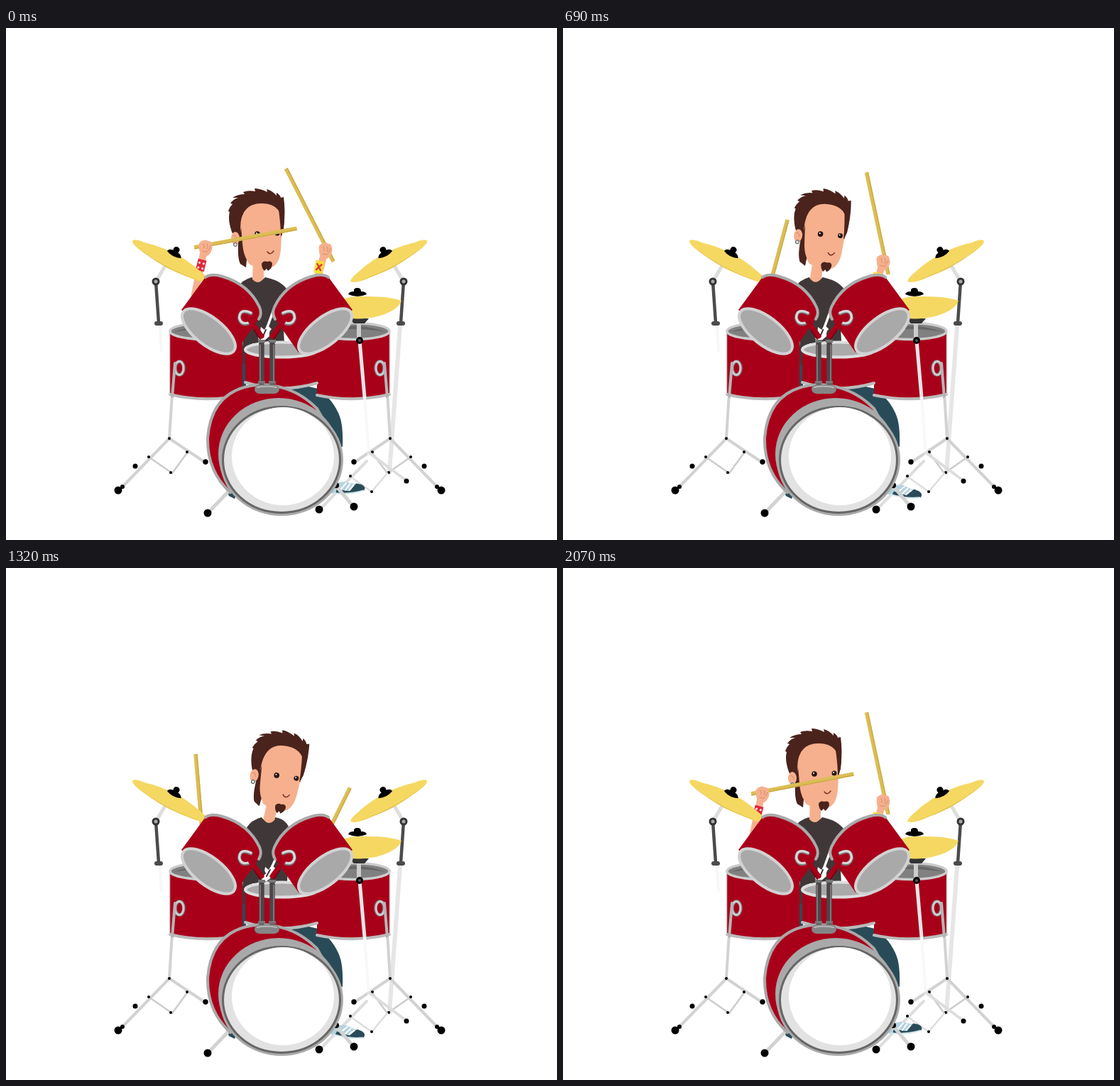
Write an HTML page that moves like this. It is 776 px wide and 721 px high and loops after 2.1 s.

```html
<!DOCTYPE html>
<html lang="en">
<head>
<meta charset="utf-8">
<title>Drummer</title>
<style>
html, body { margin: 0; width: 100%; height: 100%; overflow: hidden; background: #fff }
svg { display: block; width: 776px; height: 721px }
.line { fill: none; stroke-linecap: round; stroke-linejoin: round }
</style>
</head>
<body>
<svg viewBox="0 0 776 721">
<defs>
  <g id="stick"><path d="M0 0H147" stroke="#dcbd55" stroke-width="5.5"/><path d="M0 2H147" stroke="#c9a845" stroke-width="1.2"/></g>

  <g id="fist" fill="#f6b08e">
    <path d="M-9-4Q-10-9-5-11Q0-14 4-11Q9-11 9-6Q11-1 8 4Q5 11-2 11Q-9 9-9-4Z"/>
    <path class="line" d="M-3-7Q0-4-2-1M2-7Q5-4 2 0M7-4Q7-1 4 2M-4 3Q0 5 3 4" stroke="#d48b6c"/>
  </g>

  <!-- cymbal, stand and floor tom, shared by both sides -->
  <g id="side">
    <g class="line">
      <path d="M224 335L213 354" stroke="#ddd" stroke-width="5"/>
      <path d="M211 357L215 415" stroke="#4b4b4b" stroke-width="4.5"/>
      <path d="M212 416H218" stroke="#4b4b4b" stroke-width="6"/>
      <circle cx="211" cy="357" r="4" fill="#aaa" stroke="#333" stroke-width="3"/>
    </g>
    <g transform="translate(232 328) rotate(27.5)">
      <path d="M-61 0Q-60-5-45-6Q0-18 45-6Q60-3 61 1Q55 8 30 9Q0 13-30 8Q-58 6-61 0Z" fill="#f5d862"/>
      <path d="M-50 5Q0 14 52 5Q30 10 0 11Q-30 10-50 5Z" fill="#e3c24f"/>
      <path d="M-11-10Q-10-15-4-15Q-6-21 0-22Q6-21 4-15Q10-14 11-10Q0-5-11-10Z"/>
    </g>
    <path d="M230 427V516Q281 529 333 516V427Z" fill="#a9001a"/>
    <path class="line" d="M231 516Q281 528 333 517" stroke="#bbb" stroke-width="4"/>
    <path d="M230.500 427V516" stroke="#ccc" stroke-width="1.500"/>
    <ellipse cx="282" cy="427" rx="51" ry="11.500" fill="#808080" stroke="#ccc" stroke-width="3.500"/>
    <path d="M236 428Q281 411 328 428Q281 420 236 428Z" fill="#666"/>
    <g class="line" stroke="#b5b5b5">
      <ellipse cx="244.500" cy="479" rx="6" ry="9.500" stroke="#777" stroke-width="4.500"/>
      <ellipse cx="244" cy="479" rx="6" ry="9.500" stroke="#ccc" stroke-width="3"/>
      <path d="M238 472L234 520" stroke-width="4"/>
      <path d="M233.500 522L230 578" stroke="#d2d2d2" stroke-width="4"/>
      <path d="M230 578L163 647M230 578L278 610" stroke="#d2d2d2" stroke-width="4"/>
      <path d="M201 604L234 627L256 597" stroke="#ccc" stroke-width="2.500"/>
    </g>
    <circle cx="158" cy="651" r="5.500"/><circle cx="164" cy="646" r="3"/>
    <circle cx="281" cy="611" r="3.700"/><circle cx="182" cy="617" r="3.500"/>
    <circle cx="201" cy="604" r="2"/><circle cx="232" cy="626" r="2"/><circle cx="255" cy="597" r="2"/><circle cx="230" cy="578" r="2"/>
  </g>

  <g id="tom">
    <path d="M247 397L280 352Q287 346 304 350Q342 361 357 394Q360 403 355 411L323 457Z" fill="#a9001a"/>
    <path class="line" d="M281 351Q289 345 305 350Q342 361 357 393Q361 402 356 410" stroke="#aaa" stroke-width="4"/>
    <ellipse cx="285.500" cy="427" rx="45" ry="19.500" transform="rotate(38 285.500 427)" fill="#a9a9a9" stroke="#d2d2d2" stroke-width="4"/>
    <path class="line" d="M345 402Q329 394 328.500 409Q331 419 341 416" stroke="#777" stroke-width="5"/>
    <path class="line" d="M345 401Q329 394 328.500 408Q331 418 341 415" stroke="#d8d8d8" stroke-width="3.200"/>
    <path class="line" d="M344 412L360 434" stroke="#a9001a" stroke-width="7"/>
    <path class="line" d="M349 425L358 438" stroke="#7a0016" stroke-width="2"/>
    <path class="line" d="M360 445V500" stroke="#4c4648" stroke-width="7.500"/>
    <path d="M358 446V500" stroke="#8a8587" stroke-width="1.500"/>
    <path d="M355 441H365M355 499H365" stroke="#777" stroke-width="4"/>
  </g>
</defs>

<g id="torso">
  <path class="line" d="M322 370L315 395" stroke="#f6b08e" stroke-width="11"/>
  <path d="M346 351Q355 362 365 351Q383 354 388 370L392 444H334Q327 400 327 365Q332 355 346 351Z" fill="#403838"/>
  <path id="sleeve" d="M372 353Q390 357 400 374L382 400Z" fill="#403838"/>
  <path class="line" d="M379 391L367 424" stroke="#fff" stroke-width="3.500"/>
  <path d="M368 418L374 424Q370 427 371 434L363 441Q355 441 355 436L361 430Q357 426 359 421L364 425Z" fill="#fff"/>
  <path class="line" d="M366 425L362 434" stroke="#403838" stroke-width="2"/>
</g>
<path d="M334 436L347 425V450Q338 460 338 475H331Z" fill="#403838"/>
<path d="M331 474H338V508H331ZM395 498L440 508Q462 525 470 547Q475 560 474 590L440 575ZM310 650L325 655L322 663L314 659Z" fill="#294b57"/>

<g id="head">
  <path d="M348 325H363V352Q356 363 347 354Z" fill="#f6b08e"/>
  <path d="M338 337L330 332Q326 325 327 304L318 287Q312 270 315 259L313 258Q315 252 319 248L316 247Q320 241 327 239L319 239Q327 234 336 234L334 231Q341 228 351 230L350 226Q358 226 368 231L367 227Q375 229 381 236L381 232Q386 235 387 239L391 238Q395 268 388 294L377 275L336 300Z" fill="#4b231d"/>
  <path d="M330 285Q329 247 360 247Q388 247 389 275L387 312Q386 328 378 335Q368 341 356 338L343 333Q335 322 331 306Z" fill="#f6b08e"/>
  <path d="M384 256Q387 278 387 294L391 283Q393 266 391 248Z" fill="#4b231d"/>
  <path d="M328 303L331 280L333 303Q334 318 339 326L338 337L330 332Q326 320 328 303Z" fill="#4b231d"/>
  <ellipse cx="323" cy="296" rx="6" ry="9" fill="#f6b08e"/>
  <path class="line" d="M320 293Q323 290 325 297" stroke="#d48b6c"/>
  <circle cx="323" cy="305" r="2.500" fill="#ddd" stroke="#555"/>
  <g fill="#291713"><circle cx="354" cy="290" r="3.800"/><circle cx="382" cy="289" r="3.500"/></g>
  <g fill="#fff"><circle cx="353" cy="289" r="1"/><circle cx="381" cy="288" r="1"/></g>
  <path class="line" d="M368 315Q372 321 377 314" stroke="#7c3526" stroke-width="1.500"/>
  <path d="M360 332Q362 327 368 329Q374 327 375 332Q375 338 369 342L367 339L364 342Q360 338 360 332Z" fill="#4b231d"/>
</g>

<use id="stickL" href="#stick"/>
<g id="armL">
  <path class="line" d="M-3 8L-15 65" stroke="#f6b08e" stroke-width="10"/>
  <g transform="translate(-6 23) rotate(14)"><path d="M-6-8H6V8H-6Z" fill="#e0283b"/><path class="line" d="M-3-3V-3M3-3V-3M-3 4V4M3 4V4" stroke="#fff" stroke-width="3"/></g>
  <use href="#fist"/>
</g>
<use id="stickR" href="#stick"/>
<g id="armR">
  <path class="line" d="M-3 8L-18 65" stroke="#f6b08e" stroke-width="10"/>
  <g transform="translate(-9 22) rotate(10)"><path d="M-6-9H6V9H-6Z" fill="#f7df38"/><path class="line" d="M-3-4L3 4M3-4L-3 4" stroke="#d83a35" stroke-width="2.500"/></g>
  <use href="#fist"/>
</g>

<path class="line" d="M217 420L219 455" stroke="#f7f7f7" stroke-width="4"/>
<path class="line" d="M555 420L540 626" stroke="#e6e6e6" stroke-width="6"/>
<use href="#side"/>
<use href="#side" transform="translate(771) scale(-1 1)"/>

<path d="M337 454V499Q387 515 439 499V454Z" fill="#a9001a"/>
<path class="line" d="M337 499Q387 515 438 500" stroke="#bbb" stroke-width="4"/>
<ellipse cx="388" cy="453" rx="51" ry="10.500" fill="#aaa" stroke="#dedede" stroke-width="4"/>

<!-- hi-hat -->
<g class="line" stroke="#ddd">
  <path d="M498 440L505 520" stroke="#e5e5e5" stroke-width="5"/>
  <path d="M497 415V437" stroke="#ccc" stroke-width="6"/>
  <path d="M505 520L511 600" stroke="#f8f8f8" stroke-width="4"/>
  <path d="M511 598L562 636M508 610L445 675" stroke-width="4"/>
  <path d="M484 631L515 653L537 627" stroke-width="2.500"/>
</g>
<path d="M483 409H511L505 416H490Z" fill="#333"/>
<circle cx="498" cy="440" r="5"/><circle cx="498" cy="440" r="2" fill="#555"/>
<path d="M458 391Q476 377 500 378Q538 377 557 384Q552 399 520 407Q488 413 460 404Z" fill="#f5d862"/>
<path d="M482 375Q483 371 490 371Q489 366 495 366Q500 366 500 371Q507 371 508 375Q495 381 482 375Z"/>
<circle cx="564" cy="638" r="3.500"/><circle cx="485" cy="631" r="2"/><circle cx="515" cy="653" r="2"/>

<g id="shoe">
  <path d="M458 643L478 641Q490 646 501 647Q508 651 504 656Q480 660 458 656Z" fill="#b4d2dd"/>
  <path id="toe" d="M466 651L484 655L494 645L501 647Q508 651 504 656Q480 659 464 656Z" fill="#294b57"/>
  <path id="heel" d="M458 643L472 642L484 654L462 655Z" fill="#294b57"/>
  <path class="line" d="M472 651L480 643M478 653L485 645M484 653L490 647" stroke="#fff" stroke-width="2"/>
  <path class="line" d="M462 656Q484 660 503 656" stroke="#d8e8ed" stroke-width="2"/>
</g>

<!-- bass drum -->
<g class="line" stroke="#d2d2d2" stroke-width="5">
  <path d="M314 652L288 679M464 644L487 671"/>
</g>
<circle cx="284" cy="683" r="5.500"/><circle cx="490" cy="674" r="5.500"/><circle cx="441" cy="678" r="5.500"/><circle cx="465" cy="644" r="4"/>
<path d="M316 654Q283 624 284 577Q290 505 361 502Q407 504 438 536L460 575Z" fill="#a9001a" stroke="#a9a9a9" stroke-width="4"/>
<ellipse cx="384" cy="600" rx="85" ry="79" fill="#a9a9a9"/>
<ellipse cx="388" cy="608" rx="85" ry="77" fill="#e2e2e2" stroke="#aaa" stroke-width="4"/>
<ellipse cx="388" cy="608" rx="82.500" ry="74.500" fill="none" stroke="#666" stroke-width="3"/>
<ellipse cx="390" cy="603" rx="72" ry="69" fill="#fff"/>

<use href="#tom"/>
<use href="#tom" transform="translate(735) scale(-1 1)"/>
<path d="M350 508Q351 502 358 502H377Q385 503 385 509Q384 515 376 515H358Q350 515 350 508Z" fill="#858585"/>
<path class="line" d="M354 506Q367 503 381 506" stroke="#bbb" stroke-width="2"/>
</svg>
<script>
const LOOP = 2100, STEP = 30;
// time, chin x y, head turn, left stick x y angle, right stick x y angle, foot angle
const poses = [
  [0,    368, 335, 0,  265, 309, -10.5, 461, 329, -117,  -5],
  [510,  361, 337.5, 8,  295, 395, -126,  432, 505, -90,   14],
  [690,  371, 336.5, 7,  278, 412, -75,   458, 347, -102,  6],
  [870,  386, 336.5, 6,  250, 432, -30,   386, 445, -77.4, 0],
  [1140, 398, 339, 10.5, 260, 415, -76,   404, 461, -38,   0],
  [1530, 372, 338.5, 11, 304, 400, -118.8, 439, 416, -96.6, 14],
  [1860, 373, 336, 6,  262, 383, -36,   447, 411, -59.8, 1],
  [2070, 368, 335, 0,  265, 318, -11,   458, 347, -102,  -5],
  [2100, 368, 335, 0,  265, 309, -10.5, 461, 329, -117,  -5]
];
const $ = id => document.getElementById(id);
const move = (id, value) => $(id).setAttribute('transform', value);
const show = (id, on) => $(id).setAttribute('visibility', on ? 'visible' : 'hidden');

function poseAt(t) {
  const i = poses.findIndex(p => p[0] > t), a = poses[i - 1], b = poses[i];
  const u = (1 - Math.cos(Math.PI * (t - a[0]) / (b[0] - a[0]))) / 2;
  return a.map((v, k) => v + (b[k] - v) * u);
}

// Places stick and hand; a lowered hand stays behind the drums.
function drawArm(side, x, y, angle, dx, dy) {
  const r = angle * Math.PI / 180;
  const hx = x + 16 * Math.cos(r) + dx, hy = y + 16 * Math.sin(r) + dy;
  const raised = hy < 360;
  move('stick' + side, `translate(${x} ${y}) rotate(${angle})`);
  move('arm' + side, `translate(${hx} ${hy})`);
  show('arm' + side, raised);
  return raised;
}

function frame(now) {
  const t = Math.floor(now % LOOP / STEP) * STEP;
  const [, x, y, turn, lx, ly, la, rx, ry, ra, foot] = poseAt(t);
  const lean = (x - 368 - turn / 3) / 140;
  move('head', `translate(${x} ${y}) rotate(${turn}) translate(-368 -335)`);
  move('torso', `matrix(1 0 ${-lean} 1 ${480 * lean} 0)`);
  drawArm('L', lx, ly, la, 0, 5);
  show('sleeve', drawArm('R', rx, ry, ra, -4, 0));
  move('shoe', `rotate(${foot} 452 652)`);
  show('toe', foot <= 7);
  show('heel', foot > 7);
  requestAnimationFrame(frame);
}
requestAnimationFrame(frame);
</script>
</body>
</html>
```
